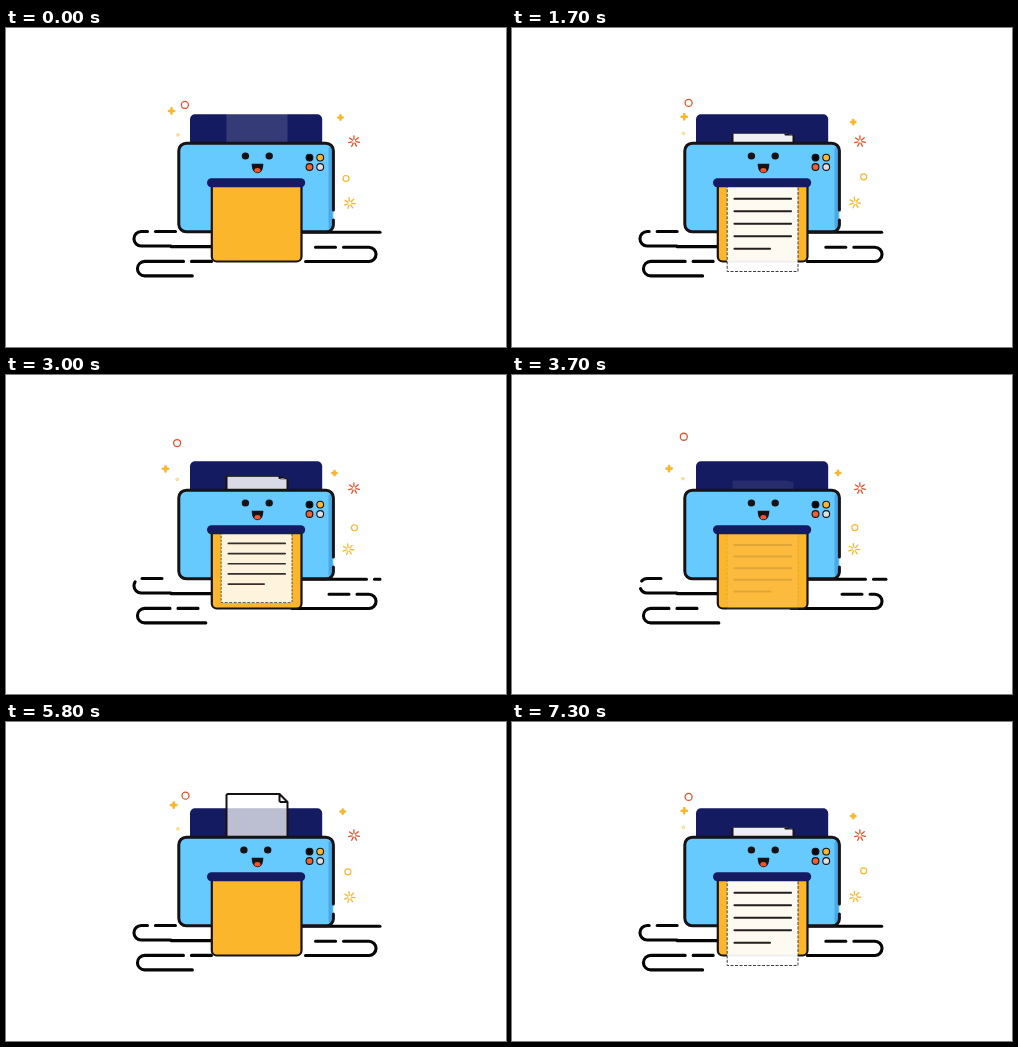
An HTML page with a canvas for the animation above (7.4 s loop, 500 px wide and 319 px high).

```html
<!DOCTYPE html>
<html lang="en">
<head>
<meta charset="utf-8">
<title>Happy printer</title>
<style>
  html, body { margin: 0; width: 100%; height: 100%; overflow: hidden; background: #fff; }
  canvas { display: block; }
</style>
</head>
<body>
<canvas id="stage" width="500" height="319"></canvas>
<script>
const ctx = document.getElementById('stage').getContext('2d');
const INK = '#171214', NAVY = '#141b60', BLUE = '#66caff', AMBER = '#fcb62c', RED = '#e4502a';

// Each sheet fades in, is pulled through the printer, then fades with a half-life.
const sheets = [
  { start: -.5, feed: 4, feedTime: 9.7, fade: 16.9, halfLife: 1, length: 1, floor: 260 },
  { start: 18.5, feed: 23, feedTime: 8, fade: 29.5, halfLife: 2, length: .93, floor: 235 }
];

const clamp = v => Math.max(0, Math.min(1, v));
const wave = (step, period, shift = 0) => Math.sin((step - shift) / period * 2 * Math.PI);

function paint(fill, stroke, width = 1) {
  if (fill) { ctx.fillStyle = fill; ctx.fill(); }
  if (stroke) { ctx.strokeStyle = stroke; ctx.lineWidth = width; ctx.stroke(); }
}
function box(x, y, w, h, r, fill, stroke, width) {
  ctx.beginPath();
  ctx.roundRect(x, y, w, h, r);
  paint(fill, stroke, width);
}
function oval(x, y, rx, ry, fill, stroke, width) {
  ctx.beginPath();
  ctx.ellipse(x, y, rx, ry, 0, 0, Math.PI * 2);
  paint(fill, stroke, width);
}
const circle = (x, y, r, ...style) => oval(x, y, r, r, ...style);
function trace(path, color, width) {
  ctx.strokeStyle = color;
  ctx.lineWidth = width;
  ctx.stroke(new Path2D(path));
}
function clipTo(x, y, w, h) {
  ctx.beginPath();
  ctx.rect(x, y, w, h);
  ctx.clip();
}

function plus(x, y, r) {
  trace(`M${x - r} ${y}h${2 * r}M${x} ${y - r}v${2 * r}`, AMBER, 2.6);
}
function star(x, y, color, turn) {
  const rays = 7;
  ctx.beginPath();
  for (let i = 0; i < rays; i++) {
    const a = turn + i / rays * 2 * Math.PI, c = Math.cos(a), s = Math.sin(a);
    ctx.moveTo(x + 2 * c, y + 2 * s);
    ctx.lineTo(x + 5.5 * c, y + 5.5 * s);
  }
  paint(null, color, 1.3);
}
function drawSparks(step) {
  const sway = 8.5 * wave(step, 48), sink = 5.5 * (1 - wave(step, 66, -16.5));
  plus(165.5 + sway, 83 + sink, 2.6);
  plus(334.5 + sway, 89.5 + sink * .8, 2.1);
  circle(175.5 + 4.5 * wave(step, 52, -7), 75.5 - .2 * step - 6.5 * wave(step, 28, 1), 3.5, null, RED, 1.3);
  circle(340 + 12 * wave(step, 80), 150.5 - 2.5 * wave(step, 44), 3, null, AMBER, 1.2);
  circle(172 - .03 * step, 107 - .09 * step, 1.3, '#fff3cf', '#fbd27c', 1);
  star(348, 113.3, RED, .2);
  star(343.7 - .045 * step, 175.2 - .03 * step, AMBER, .1);
}

// A short dash, a gap, then a long run travel together along each line.
function flowLine(path, run, offset) {
  ctx.setLineDash([20, 8, run, 900]);
  ctx.lineDashOffset = offset;
  trace(path, '#050505', 3.1);
  ctx.setLineDash([]);
}
function drawFlow(step) {
  const shift = .015 * step * step;
  flowLine('M169.5 203.5H135.2a7.25 7.25 0 0 0 0 14.5H165v.6H215', 400, -shift);
  flowLine('M205.5 233.4H138.7a7.25 7.25 0 0 0 0 14.5H300', 109, -shift);
  flowLine('M309.5 219.2H362.9a7.15 7.15 0 0 1 0 14.3H220', 111, -shift);
  flowLine('M374 204.2H290', 400, 28 - shift);
}

// The blank sheet shortens towards the feed slot.
function drawFeed(progress, alpha) {
  ctx.save();
  clipTo(200, 60, 100, 55);
  ctx.translate(220.5, 115);
  ctx.scale(1, 1 - .78 * progress);
  const outline = 'M0 10V-42l1-1H53l8 8V10';
  ctx.globalAlpha = alpha;
  ctx.fillStyle = '#fff';
  ctx.fill(new Path2D(outline));
  ctx.globalAlpha = clamp((alpha - .15) * 2);
  trace(outline + 'M53-43v7l1 1h7', INK, 2);
  ctx.restore();
}

// The printed sheet lengthens from the output slot.
function drawPrint(scale, alpha, floor) {
  if (scale <= 0) return;
  ctx.save();
  clipTo(200, 156, 100, floor - 156);
  ctx.translate(215, 158);
  ctx.scale(1, scale);
  ctx.globalAlpha = alpha;
  ctx.fillStyle = '#fff';
  ctx.fillRect(0, 0, 71, 86);
  ctx.globalAlpha = alpha ** .8;
  ctx.lineCap = 'butt';
  ctx.setLineDash([3, 1.5]);
  trace('M.2 0V85.5H71V0', '#333', 1);
  ctx.setLineDash([]);
  ctx.lineCap = 'round';
  for (let row = 0; row < 5; row++) {
    trace(`M7.5 ${12.8 + 12.5 * row}H${row < 4 ? 64 : 43}`, INK, 2.1);
  }
  ctx.restore();
}

function drawBody() {
  box(172.8, 115.2, 154.6, 88.6, 8, BLUE);
  box(322.5, 119, 4, 82, 2, '#48a9e6');
  trace('M327.4 192V197a7 7 0 0 1-7 6.8H180.3a7.5 7.5 0 0 1-7.5-7.5V122.7a7.5 7.5 0 0 1 7.5-7.5H319.9a7.5 7.5 0 0 1 7.5 7.5V182', INK, 3);
  ['#080808', AMBER, '#f0602f', '#dcdfe6'].forEach((color, i) =>
    circle(303.5 + 10.7 * (i % 2), 129.6 + 9.4 * (i >> 1), 3.4, color, INK, 1.1));
}

function drawFace(step) {
  const glance = -1.5 * clamp(1 - Math.abs(step - 2) / 2);
  const blinking = Math.abs(step % 23 - 10) < 1.5;
  for (const x of [239.4, 263.2]) oval(x + glance, blinking ? 127.5 : 128, 3.7, blinking ? 2.1 : 3.6, INK);
  ctx.fillStyle = INK;
  ctx.fill(new Path2D('M245.7 135.8H257.3C257.3 142 255 145.2 251.5 145.2S245.7 142 245.7 135.8Z'));
  oval(251.4, 142.3, 3, 2.2, '#f0562d');
}

function draw(step) {
  ctx.fillStyle = '#fff';
  ctx.fillRect(0, 0, 500, 319);
  ctx.lineCap = ctx.lineJoin = 'round';
  const sheet = sheets[step < sheets[1].start ? 0 : 1];
  const progress = clamp((step - sheet.feed) / sheet.feedTime);
  const alpha = clamp((step - sheet.start) / 3.5) * 2 ** (-Math.max(0, step - sheet.fade) / sheet.halfLife);
  drawSparks(step);
  drawFlow(step);
  box(184, 86.3, 132.2, 40, 5, NAVY);
  drawFeed(progress, alpha);
  drawBody();
  drawFace(step);
  box(205.8, 153, 89.7, 80.5, 5, AMBER, INK, 2.2);
  drawPrint(progress * sheet.length, alpha, sheet.floor);
  box(201, 150.3, 98.2, 9, 4.5, NAVY);
}

// Steps 0-39, then 24-40 again, then the opening until the loop cuts.
function stepAt(ms) {
  const n = Math.floor((ms % 7400) / 100);
  return n < 40 ? n : n < 57 ? n - 16 : n - 56;
}
function tick() {
  draw(stepAt(performance.now()));
  requestAnimationFrame(tick);
}
tick();
</script>
</body>
</html>
```
